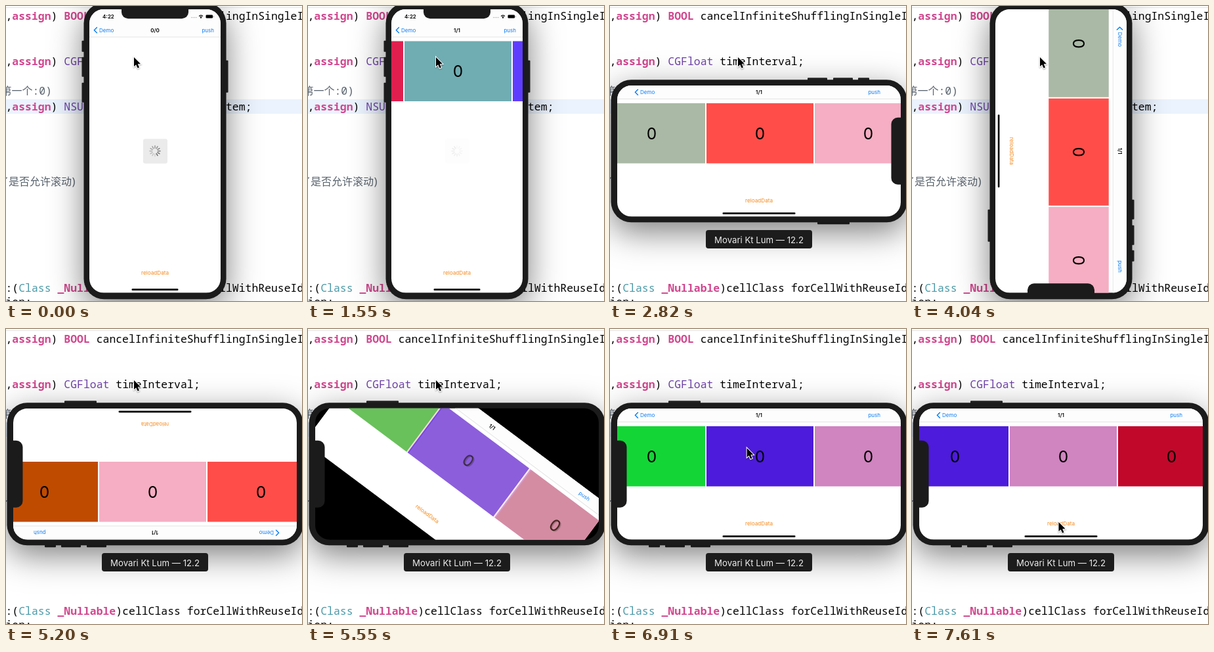
Recreate the animation shown at these times as an HTML page with a canvas. Size 451x449 px, loop 8000 ms.

```html
<!DOCTYPE html>
<html lang="en">
<head>
<meta charset="utf-8">
<title>Carousel rotation demo</title>
<style>
  html, body { margin: 0; width: 451px; height: 449px; overflow: hidden; background: #fff; }
  canvas { display: block; }
</style>
</head>
<body>
<canvas id="stage" width="451" height="449"></canvas>
<script>
const ctx = document.getElementById('stage').getContext('2d');
const LOOP = 8000, CX = 227, CY = 220.75, PITCH = 165, CELL_W = 163, CELL_H = 91.5;
const MONO = '16.45px "Noto Sans Mono", "DejaVu Sans Mono", monospace';
const CJK = '16px "Noto Sans CJK SC", "Noto Sans CJK", "Noto Sans CJK JP", sans-serif';
const PINK = '#d0488f', PURPLE = '#6f42a8', TEAL = '#4a9aa8', INK = '#000', BLUE = '#0a7cf5';
const COLORS = {
  first: ['#e11f4f', '#70adb2', '#5f3dff'],
  second: ['#a9b9a5', '#ff4e4a', '#f5aec3', '#bf4b00'],
  third: ['#13d636', '#4d1bdb', '#d084c0', '#c1082b']
};
const CODE = [
  [21, [',', INK], ['assign', PINK, 1], [') ', INK], ['BOOL', PINK, 1], [' cancelInfiniteShufflingInSingleItem', INK]],
  [90, [',', INK], ['assign', PINK, 1], [') ', INK], ['CGFloat', PURPLE], [' timeInterval;', INK]],
  [159, [',', INK], ['assign', PINK, 1], [') ', INK], ['NSUInteger', PURPLE], [' placeholderAtItem;', INK]],
  [435, [':(', INK], ['Class', TEAL], [' ', INK], ['_Nullable', PINK, 1], [')cellClass forCellWithReuseIdentifier', INK]],
  [456, ['ion;', INK]]
];

const lerp = (a, b, k) => a + (b - a) * k;
const span = (t, a, b) => Math.min(1, Math.max(0, (t - a) / (b - a)));
const smooth = k => k * k * (3 - 2 * k);
const easeOut = k => 1 - (1 - k) ** 2;
const inter = (size, weight = 400) => `${weight} ${size}px Inter, "Liberation Sans", sans-serif`;

function text(s, x, y, font, color, align = 'left') {
  ctx.font = font;
  ctx.fillStyle = color;
  ctx.textAlign = align;
  ctx.fillText(s, x, y);
}

function box(x, y, w, h, r, color) {
  ctx.fillStyle = color;
  ctx.beginPath();
  ctx.roundRect(x, y, w, h, r);
  ctx.fill();
}

function layer(alpha, draw) {
  if (alpha <= 0) return;
  ctx.save();
  ctx.globalAlpha *= alpha;
  draw();
  ctx.restore();
}

function drawEditor() {
  box(0, 0, 451, 449, 0, '#fff');
  box(0, 2, 451, 1, 0, '#e4e4e4');
  box(0, 142, 451, 22, 0, '#ebf3fe');
  for (const [y, ...parts] of CODE) {
    let x = -0.5;
    for (const [s, color, bold] of parts) {
      text(s, x, y, (bold ? 'bold ' : '500 ') + MONO, color);
      x += s.length * 9.87;
    }
  }
  const comment = '#59636e';
  text(':0)', 70, 135, MONO, comment, 'right');
  text('第一个', 40.5, 135, CJK, comment, 'right');
  text(')', 108, 273, MONO, comment, 'right');
  text('了是否允许滚动', 100, 273, CJK, comment, 'right');
}

function drawCell(color, x, y) {
  box(x - CELL_W / 2, y, CELL_W, CELL_H, 0, color);
  text('0', x, y + CELL_H / 2 + 9, inter(24.5), '#000', 'center');
}

function drawCells(colors, center, y) {
  colors.forEach((color, i) => drawCell(color, center + (i - 1) * PITCH, y));
}

function drawStatus(top) {
  text('4:22', -80, top + 14, inter(8, 600), '#000');
  for (let i = 0; i < 4; i++) box(55 + i * 2.4, top + 12, 1.4, 1.4, 1, '#aaa');
  ctx.strokeStyle = '#000';
  ctx.lineWidth = 1.3;
  for (const r of [2.2, 4.4]) {
    ctx.beginPath();
    ctx.arc(70, top + 14, r, -2.3, -0.84);
    ctx.stroke();
  }
  box(69.2, top + 12.6, 1.6, 1.6, 1, '#000');
  box(77.5, top + 8.8, 10.5, 5, 1.3, '#000');
  box(88.6, top + 10.4, 1, 1.8, 0.5, '#777');
}

function drawSpinner(t) {
  box(-18, -18.5, 37, 37.5, 3, '#ebebeb');
  const step = Math.max(0, Math.floor((t - 8) / 82));
  ctx.lineWidth = 1.5;
  ctx.lineCap = 'round';
  for (let i = 0; i < 12; i++) {
    const a = (i + step + 3) * Math.PI / 6, shade = 205 - i * 9;
    ctx.strokeStyle = `rgb(${shade},${shade},${shade})`;
    ctx.beginPath();
    ctx.moveTo(Math.cos(a) * 4.4, Math.sin(a) * 4.4);
    ctx.lineTo(Math.cos(a) * 8, Math.sin(a) * 8);
    ctx.stroke();
  }
}

// q runs from the portrait layout (0) to the landscape one (1)
function drawApp(t, q, flip) {
  const w = lerp(200, 432, q), h = lerp(432, 200, q), top = -h / 2;
  const nav = top + lerp(32, 10.5, q), cellY = nav + 16.75;
  ctx.beginPath();
  ctx.rect(-w / 2, top, w, h);
  ctx.clip();
  box(-w / 2, top, w, h, 0, '#fff');

  if (t >= 910) {
    const fade = 1 - (1 - q) ** 1.5;
    const secondX = 1.5 + 116 * (1 - q) - 163 * smooth(span(t, 4130, 4490));
    const thirdX = 1.5 - 163 * smooth(span(t, 7140, 7610));
    layer(flip, () => drawCells(COLORS.third, thirdX, cellY));
    layer(fade * (1 - flip), () => {
      drawCells(COLORS.second, secondX, cellY);
      // the reused cell blends out of its former colour
      layer(1 - fade, () => drawCell(COLORS.first[2], secondX, cellY));
    });
    layer(1 - fade, () => drawCells(COLORS.first, 1.5, cellY));
  }

  box(-w / 2, top, w, nav + 10.5 - top, 0, '#fdfdfd');
  box(-w / 2, nav + 10, w, 0.7, 0, '#dcdcdc');
  const left = -w / 2 + lerp(15, 35, q);
  ctx.strokeStyle = BLUE;
  ctx.lineWidth = 1.4;
  ctx.beginPath();
  ctx.moveTo(left - 3.2, nav - 4.6);
  ctx.lineTo(left - 7.6, nav);
  ctx.lineTo(left - 3.2, nav + 4.6);
  ctx.stroke();
  text('Demo', left, nav + 3, inter(8), BLUE);
  text('push', w / 2 - lerp(10, 31, q), nav + 3, inter(8), BLUE, 'right');
  text(t < 910 ? '0/0' : '1/1', 0, nav + 3, inter(8, 600), '#000', 'center');
  text('reloadData', 0, h / 2 - lerp(30.5, 24.5, q) + 3, inter(8.2), '#f58a1f', 'center');
  layer(1 - 3 * q, () => drawStatus(top));

  const fadeOut = 1 - span(t, 2320, 2380) + span(t, 2600, 2820);
  const barAlpha = t < 5255 ? Math.min(1, fadeOut) : span(t, 5810, 6130);
  const barW = lerp(71, 111, q);
  layer(barAlpha, () => box(-barW / 2, h / 2 - 6.4, barW, 2.6, 1.3, '#000'));
  if (t < 2150) layer(lerp(1, 0.12, span(t, 1230, 1550)), () => drawSpinner(t));
}

function drawPhone(t) {
  const turn = t < 2150 ? 0 : t < 4040 ? 1 : t < 5200 ? 2 : 3;
  const q = easeOut(span(t, 2328, 2720)), flip = easeOut(span(t, 5255, 5795));
  const angle = turn === 0 ? 0 : turn === 1 ? 90 * (1 - q) : turn === 2 ? 90 : 180 * (1 - flip);
  const body = '#1b1b1b', button = '#262626';

  ctx.save();
  ctx.translate(CX, CY);
  ctx.rotate(turn * Math.PI / 2);
  for (const [y, len] of [[-168, 17], [-143, 30], [-104, 30]]) box(-111.5, y, 6, len, 1, button);
  box(105.5, -138, 6, 49, 1, button);
  ctx.save();
  ctx.shadowColor = 'rgba(0,0,0,.5)';
  ctx.shadowBlur = 50;
  ctx.shadowOffsetY = 15;
  box(-108.5, -225.5, 217, 451, 31, body);
  ctx.restore();

  ctx.save();
  ctx.beginPath();
  ctx.roundRect(-100, -216, 200, 432, 22);
  ctx.fillStyle = '#000';
  ctx.fill();
  ctx.clip();
  ctx.rotate(angle * Math.PI / 180 - turn * Math.PI / 2);
  drawApp(t, q, flip);
  ctx.restore();

  box(-51, -218, 102, 16.5, [0, 0, 10, 10], body);
  ctx.restore();

  if (turn % 2) {
    box(146, 341, 162, 28, 4, '#1c1c1c');
    text('Movari Kt Lum — 12.2', CX, 360.5, inter(13.2), '#ececec', 'center');
  }
}

function drawCursor(t) {
  const k = smooth(span(t, 6450, 7400));
  ctx.save();
  ctx.translate(lerp(195, 223.5, k), lerp(78, 294, k));
  ctx.beginPath();
  for (const [x, y] of [[0, 0], [0, 14], [3.2, 11.2], [5.6, 16.6], [8, 15.6], [5.7, 10.3], [10, 10.1]]) ctx.lineTo(x, y);
  ctx.closePath();
  ctx.shadowColor = 'rgba(0,0,0,.35)';
  ctx.shadowBlur = 2;
  ctx.shadowOffsetY = 1;
  ctx.strokeStyle = '#fff';
  ctx.lineWidth = 2;
  ctx.stroke();
  ctx.shadowColor = 'transparent';
  ctx.fillStyle = '#000';
  ctx.fill();
  ctx.restore();
}

function frame() {
  const t = performance.now() % LOOP;
  drawEditor();
  drawPhone(t);
  drawCursor(t);
  requestAnimationFrame(frame);
}
frame();
</script>
</body>
</html>
```
